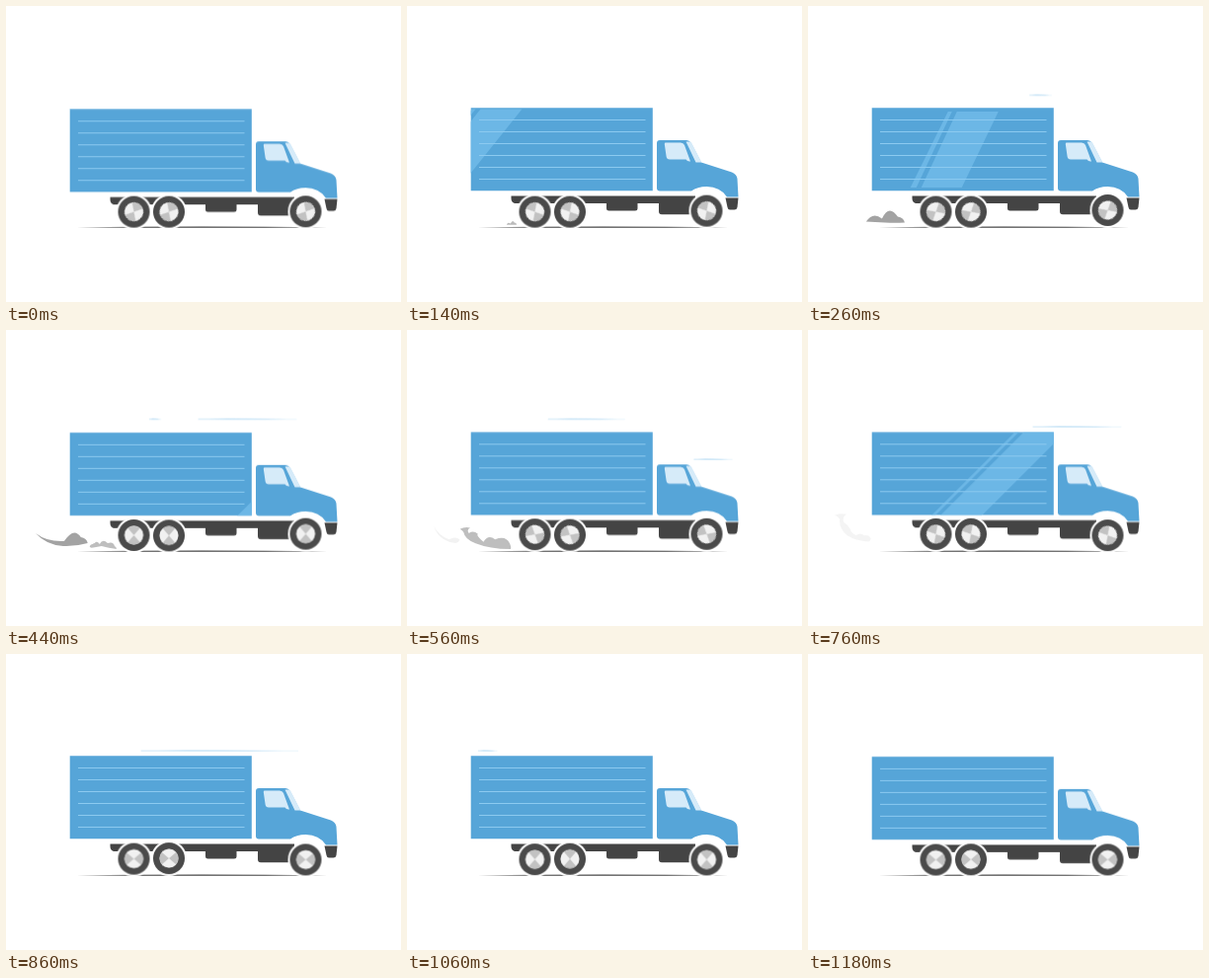
An HTML page that plays this animation: 400x300 px, repeating every 1.2 s.

```html
<!DOCTYPE html>
<html lang="en">
<head>
<meta charset="utf-8">
<title>Delivery truck</title>
<style>
html, body { margin: 0; width: 100%; height: 100%; overflow: hidden; background: #fff; }
svg { display: block; width: 100vw; height: 100vh; }

.blue { fill: #56a5d8; }
.dark { fill: #444; }
.tyre { fill: #4a4a4a; }
.glass { fill: #d6ebf9; }
.slats { stroke: #8ccaf0; stroke-width: 1; }
.wind { fill: #a9d5f1; }

.bob { animation: bob .2s linear infinite; }
.hop { animation: hop .6s ease-in-out var(--delay) infinite; }
.spin { animation: spin .2s linear infinite; }
.wind path, .shine, .puff, .curl { animation: 1.2s linear infinite; }

@keyframes bob {
  0%, 100% { transform: translateY(1.2px); }
  20% { transform: translateY(.8px); }
  30%, 75% { transform: translateY(0); }
  90% { transform: translateY(.8px); }
}
@keyframes hop {
  0%, 80%, 100% { transform: translateY(0); }
  40% { transform: translateY(-1.8px); }
}
@keyframes spin {
  from { transform: rotate(90deg); }
  to { transform: rotate(450deg); }
}

/* Wind streaks: left edge, then length */
.wind .w1 { animation-name: w1; }
.wind .w2 { animation-name: w2; }
.wind .w3 { animation-name: w3; }
.wind .w4 { animation-name: w4; }
@keyframes w1 {
  0%, 19.2% { transform: translate(247px, 90.3px) scaleX(0); }
  21.667% { transform: translate(225px, 90.3px) scaleX(22); }
  28.333% { transform: translate(165px, 90.3px) scaleX(60); }
  36.667% { transform: translate(145px, 90.3px) scaleX(13); }
  38.333%, 100% { transform: translate(143px, 90.3px) scaleX(0); }
}
@keyframes w2 {
  0%, 25% { transform: translate(310px, 90.3px) scaleX(0); }
  36.667% { transform: translate(195px, 90.3px) scaleX(100); }
  55% { transform: translate(100px, 90.3px) scaleX(60); }
  63.333%, 100% { transform: translate(90px, 90.3px) scaleX(0); }
}
@keyframes w3 {
  0%, 40% { transform: translate(344px, 131px) scaleX(0); }
  55% { transform: translate(225px, 131px) scaleX(87); }
  68%, 100% { transform: translate(150px, 131px) scaleX(0); }
}
@keyframes w4 {
  0%, 52.5% { transform: translate(338px, 98px) scaleX(0); }
  55% { transform: translate(320px, 98px) scaleX(18); }
  71.667% { transform: translate(137px, 98px) scaleX(160); }
  88.333% { transform: translate(72px, 98px) scaleX(20); }
  91.667%, 100% { transform: translate(68px, 98px) scaleX(0); }
}

.shine { fill: #6cb7e6; animation-name: shine; }
@keyframes shine {
  0%, 5%, 52%, 100% { d: path("M23 103L65 103L-20 188L-62 188ZM14 103L18 103L-67 188L-71 188Z"); }
  21.667% { d: path("M150 107L192 107L155 184L114 184ZM141 107L145 107L109 184L103 184Z"); }
  29.167% { d: path("M222 103L264 103L222 188L181 188ZM213 103L217 103L175 188L170 188Z"); }
  36.667% { d: path("M318 103L360 103L275 188L233 188ZM318 103L318 103L233 188L233 188Z"); }
  39%, 51.99% { d: path("M339 103L381 103L296 188L254 188ZM339 103L339 103L254 188L254 188Z"); }
  55% { d: path("M56 103L98 103L13 188L-29 188ZM47 103L51 103L-34 188L-38 188Z"); }
  70%, 99.99% { d: path("M346 103L388 103L303 188L261 188ZM337 103L341 103L256 188L252 188Z"); }
}

.puff { fill: #a3a3a3; animation-name: puff; }
@keyframes puff {
  0%, 11% { opacity: 0; d: path("M104 222Q105 219 107 221Q109 217 110 220Q112 220 112 222Q110 222 108 222Q106 222 104 222Z"); }
  12% { opacity: 1; }
  21.667% { d: path("M59 218.500Q66 208 75 215.500Q82 200.500 91 213.500Q97 214.500 98 219.500Q88 220 78 219.500Q68 219 59 218.500Z"); }
  36.667% { opacity: 1; d: path("M30 206Q42 215 59 214Q69 199 76 210Q82 211 83 216Q71 219.500 58 219Q41 218 30 206Z"); }
  48.333%, 100% { opacity: 0; d: path("M27 198Q30 207 40 212Q46 210 50 213Q48 216 44 216Q38 215 34 211Q28 206 27 198Z"); }
}

.curl { fill: #bebebe; animation-name: curl; }
@keyframes curl {
  0%, 30% { opacity: 0; d: path("M108 222Q108 222 108 221Q109 221 109 221Q109 221 109 221Q109 220 110 221Q110 220 111 221Q112 220 112 221Q112 222 112 222Q111 222 110 222Q109 222 109 222Q108 222 108 222Z"); }
  31% { opacity: 1; }
  36.667% { d: path("M85 220Q85 219 86 218Q87 217 88 217Q89 216 90 216Q92 213 95 217Q98 211 103 216Q109 214 110 219Q112 220 112 222Q104 221 97 219Q91 220 87 221Q86 221 85 220Z"); }
  55% { opacity: 1; d: path("M28 187Q36 183 46 186Q38 190 42 197Q49 192 57 199Q51 204 63 213Q69 203 78 209Q93 203 99 214Q101 220 99 222Q68 223 47 214Q32 206 33 192Q32 189 28 187Z"); }
  65%, 100% { opacity: 0; d: path("M27 188Q32 186 38 187Q34 189 35 194Q38 198 40 202Q42 206 46 207Q50 206 53 208Q56 208 57 211Q56 213 54 213Q44 212 38 207Q31 200 32 192Q30 189 27 188Z"); }
}
</style>
</head>
<body>
<svg viewBox="0 0 400 300">
  <defs>
    <clipPath id="box"><path d="M64.700 103.300H248.800V187.300H64.700Z"/></clipPath>
    <g id="wheel">
      <g class="hop">
        <circle r="18" fill="#fff"/>
        <circle class="tyre" r="16"/>
        <g class="spin">
          <circle r="9.600" fill="#f1f1f1"/>
          <path fill="#c2c2c2" d="M0 0L-6.200 -7.330A9.600 9.600 0 0 1 6.200 -7.330ZM0 0L6.200 7.330A9.600 9.600 0 0 1 -6.200 7.330Z"/>
        </g>
      </g>
    </g>
  </defs>

  <g class="wind">
    <path class="w1" d="M0 0C.1 -.9 .7 -.7 1 0C.7 .7 .1 .9 0 0Z"/>
    <path class="w2" d="M0 0C.1 -.9 .7 -.7 1 0C.7 .7 .1 .9 0 0Z"/>
    <path class="w3" d="M0 0C.1 -.9 .7 -.7 1 0C.7 .7 .1 .9 0 0Z"/>
    <path class="w4" d="M0 0C.1 -.9 .7 -.7 1 0C.7 .7 .1 .9 0 0Z"/>
  </g>

  <path class="dark" d="M72 224.2Q198 222.8 325 224.2Q198 225.4 72 224.2Z"/>
  <path class="puff" d=""/>
  <path class="curl" d=""/>

  <g class="bob">
    <path class="dark" d="M105.5 192.6H292V210H287V211.3H258Q255 211.3 255 208.3V200H233.500V205Q233.500 207.500 231 207.500H204.500Q202 207.500 202 205V200H109Q105.500 199 105.500 195Z"/>
    <path class="blue" d="M64.700 103.300H248.800V187.300H64.700Z"/>
    <g clip-path="url(#box)"><path class="shine" d=""/></g>
    <path class="slats" d="M73 115.500h168.500m-168.500 12h168.500m-168.500 12h168.500m-168.500 12h168.500m-168.500 12h168.500m-168.500 12h168.500"/>
    <path class="blue" d="M253 139Q253 136 256 136H283Q286 136 287.500 138.500L298 158.500L329 168.500Q334 170.500 334.500 175L335.500 193.500H324Q317 183 303.500 183Q294 183 288 187.500H256Q253 187.500 253 184.500Z"/>
    <path class="glass" d="M261.500 138.500H277Q280 138.500 281 141L287 157.500Q284 158 282.500 155.500H266Q263 155.500 262.600 152.500L260.800 140Q260.800 138.500 261.500 138.500Z"/>
    <path class="glass" d="M282.500 137.500H286Q287.500 137.500 288 138.500L298.500 158.500H292.500Z"/>
    <path class="dark" d="M322.500 194.500H335.500L334.500 204Q334 206.500 331.500 206.500H327Q325 206.500 324.500 204Z"/>
  </g>

  <use href="#wheel" x="129.500" y="208.600" style="--delay: -.45s"/>
  <use href="#wheel" x="165" y="208.600" style="--delay: -.41s"/>
  <use href="#wheel" x="303.500" y="208.400" style="--delay: -.58s"/>
</svg>
</body>
</html>
```
